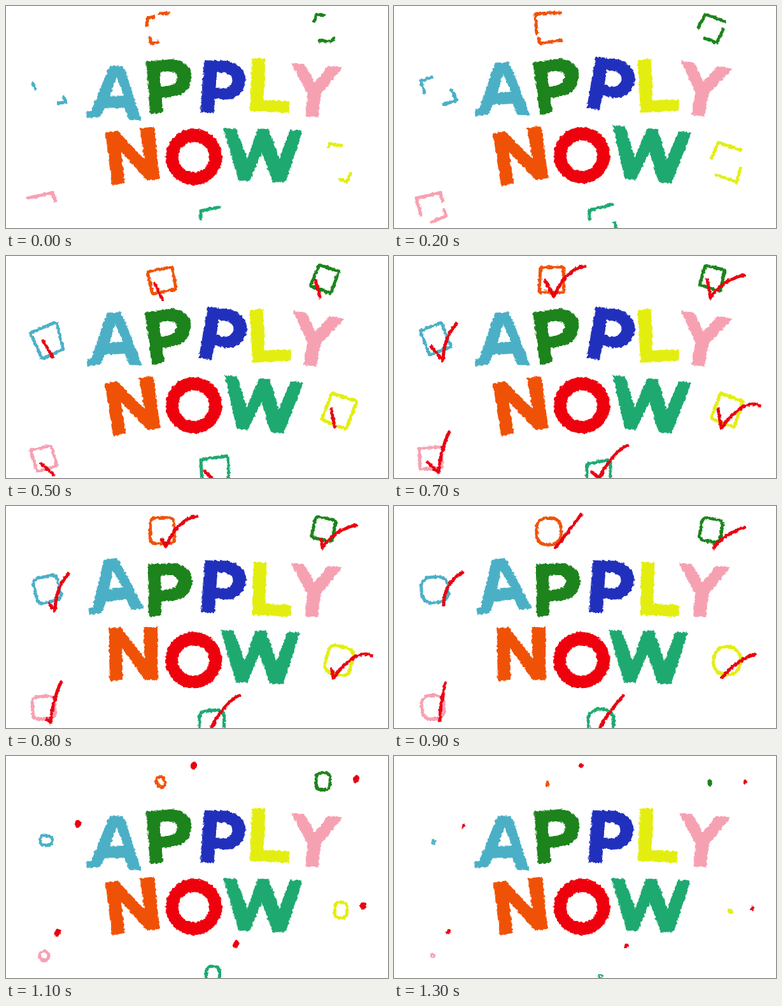
Animation of 600 by 350 pixels, one loop 1.4 s. Source, as an HTML page with a canvas:

```html
<!DOCTYPE html>
<html lang="en">
<head>
<meta charset="utf-8">
<title>Apply now</title>
<style>
  html, body { margin: 0; width: 100%; height: 100%; overflow: hidden; background: #fff; }
  canvas { display: block; filter: url(#rough); }
  svg { position: absolute; }
</style>
</head>
<body>
<canvas id="stage" width="600" height="350" role="img" aria-label="APPLY NOW"></canvas>
<svg width="0" height="0">
  <filter id="rough" x="0" y="0" width="1" height="1" color-interpolation-filters="sRGB">
    <feTurbulence type="fractalNoise" baseFrequency=".22" numOctaves="2" seed="4"/>
    <feDisplacementMap in="SourceGraphic" scale="5" xChannelSelector="R" yChannelSelector="G"/>
  </filter>
</svg>
<script>
const ctx = document.getElementById('stage').getContext('2d');
const RED = '#ea0010', STEP = 100, STEPS = 14;

// Each letter: colour, pivot, outline, then [degrees, dx, dy] for the two other poses.
const letters = [
  ['#4bb0c6', 170, 137, 'M163 95H183L187 103 212 180 193 178 187 160H155L148 173 145 175 127 176V167L134 166 160 102ZM174 111 186 142H163Z',
    [-3.3, -1.3, -5.5], [-9.5, -2.5, -11]],
  ['#1d831c', 255, 127, 'M221 88L264 84Q291 89 291 113Q288 138 264 142L244 145 246 167 227 170ZM242 104L258 102Q270 105 270 113Q268 124 256 126L243 128Z',
    [-3.5, 0, -.5], [3.5, 0, 6]],
  ['#2130bc', 341, 127, 'M312 86L348 87Q375 93 376 117Q372 146 345 147L328 145 326 168 306 167ZM331 104L344 105Q357 109 356 118Q353 131 341 131L329 129Z',
    [5.7, 1, -3], [0, 1, 0]],
  ['#e3ee10', 415, 126, 'M387 83H407L404 148 445 151 444 168 384 165Z', [-5, 0, 0], [-1, 2.5, 6]],
  ['#f6a1b2', 487, 133, 'M448 90L468 92 485 121 506 95 528 97 494 139 490 175 471 174 474 138Z', [4, 0, -1], [0, -.5, 0]],
  ['#ef5206', 199, 236, 'M157 200L175 197 218 243 211 193 232 191 241 272 222 275 180 228 186 279 167 282Z', [-2, 0, 0], [6, 1, -3]],
  ['#ef000d', 295, 238, 'M251 238a44 44 0 1 0 88 0a44 44 0 1 0-88 0ZM270 238.5a25 24.5 0 1 0 50 0a25 24.5 0 1 0-50 0Z',
    [0, 0, -2.5], [0, -.5, 5]],
  ['#1ea971', 403, 235, 'M342 193L361 194 379 242 396 194H412L429 243 446 196 465 197 439 277 419 277 402 230 383 275 366 275Z',
    [3.5, -.7, -.5], [0, -4, 3]],
];

// Shapes are four corners followed by a corner radius.
const quad = (...corners) => [...corners, 2];
function rect(cx, cy, w, h, r, degrees = 0) {
  const a = degrees * Math.PI / 180, c = Math.cos(a), s = Math.sin(a);
  const corners = [[-1, -1], [1, -1], [1, 1], [-1, 1]].flatMap(([i, j]) => {
    const x = i * w / 2, y = j * h / 2;
    return [cx + x * c - y * s, cy + x * s + y * c];
  });
  return [...corners, r];
}

// open: first pen strokes; shapes: keys two steps apart; leg, tick, tail, dots: the red mark.
const boxes = [
  { color: '#ef5206',
    open: ['M232 17L222 19 221 30M242 12L256 11M226 50L228 59 239 57', 'M261 11Q235 10 222 14L224 43M227 51L229 59 262 54'],
    shapes: [quad(222, 25, 261, 17, 267, 52, 230, 60), quad(230, 18, 266, 17, 267, 57, 228, 57),
      rect(243, 40, 38, 42, 15), rect(243, 41, 12, 16, 5, -25), rect(241, 43, 1, 5, .4)],
    leg: 'M234 44L245 67', tick: 'M237 38L251 64Q270 20 300 16', tail: 'M254 65Q275 40 294 13',
    dots: [295, 15, 294, 15] },
  { color: '#1d831c',
    open: ['M484 24L488 13 499 14M492 55L510 56 515 51', 'M478 34L489 13 519 24M488 51L507 58 517 37'],
    shapes: [quad(492, 14, 523, 24, 510, 59, 478, 47), quad(489, 15, 520, 22, 512, 56, 480, 45),
      rect(498, 38, 33, 36, 8, 10), rect(498, 40, 22, 27, 8, 4), rect(496, 42, 2, 6, .8)],
    leg: 'M486 38L493 65', tick: 'M492 37L497 66Q515 38 550 30', tail: 'M502 66Q520 43 550 34',
    dots: [550, 36, 552, 41] },
  { color: '#4bb0c6',
    open: ['M42 121L46 131M91 143L94 152 82 153', 'M60 112L42 118 48 137M91 133L98 149 78 155'],
    shapes: [quad(38, 121, 79, 104, 90, 147, 57, 162), quad(41, 118, 74, 105, 90, 143, 56, 156),
      rect(64, 132, 42, 40, 15, -5), rect(63, 133, 19, 15, 6, 8), rect(62, 136, 2, 4, .8)],
    leg: 'M58 134L73 158', tick: 'M58 142L77 165Q78 128 98 107', tail: 'M78 156Q78 122 108 104',
    dots: [113, 107, 109, 110] },
  { color: '#e3ee10',
    open: ['M507 222L508 217 526 220M524 273L535 278 541 264', 'M499 240L509 215 545 227M506 266L538 278 544 256'],
    shapes: [quad(512, 216, 551, 229, 534, 273, 496, 258), quad(513, 216, 548, 229, 534, 270, 498, 256),
      rect(523, 244, 42, 45, 20, 10), rect(526, 243, 19, 25, 7, 4), rect(528, 245, 4, 3, 1)],
    leg: 'M511 242L516 269', tick: 'M509 242L514 271Q551 223 574 236', tail: 'M515 270Q545 238 567 234',
    dots: [561, 236, 563, 240] },
  { color: '#f6a1b2',
    open: ['M34 303L73 294 77 307', 'M42 329L35 303 73 294 76 307M78 321L82 331 58 341'],
    shapes: [quad(38, 306, 71, 299, 80, 331, 49, 340), quad(39, 303, 75, 301, 75, 334, 41, 336),
      rect(61, 317, 35, 37, 13, -4), rect(60, 315, 14, 14, 6.5), rect(61, 315, 3, 2, .8)],
    leg: 'M55 327L75 345', tick: 'M53 325L70 342Q72 310 86 278', tail: 'M72 338Q73 305 81 279',
    dots: [81, 279, 85, 277] },
  { color: '#1ea971',
    open: ['M306 335V323L335 317', 'M307 336V322L343 313M347 341L350 352'],
    shapes: [quad(306, 321, 348, 315, 350, 352, 308, 360), quad(303, 328, 340, 321, 340, 362, 303, 362),
      rect(325, 341, 40, 42, 18), rect(325, 344, 21, 25, 9), rect(324, 347, 2, 2, .8)],
    leg: 'M312 339L323 350', tick: 'M311 341L322 350Q345 308 366 299', tail: 'M323 350Q335 328 360 299',
    dots: [361, 297, 365, 299] },
];

const mix = (a, b, k) => a + (b - a) * k;

function stroke(path, color, width = 5) {
  ctx.strokeStyle = color;
  ctx.lineWidth = width;
  ctx.stroke(path);
}

function roundPoly(s) {
  const p = new Path2D(), r = s[8];
  p.moveTo((s[6] + s[0]) / 2, (s[7] + s[1]) / 2);
  for (let i = 0; i < 8; i += 2) {
    const j = (i + 2) % 8;
    p.arcTo(s[i], s[i + 1], (s[i] + s[j]) / 2, (s[i + 1] + s[j + 1]) / 2, r);
  }
  p.closePath();
  return p;
}

// Strokes around two opposite corners, reaching a share k along each side.
function cornerStrokes(s, k) {
  const p = new Path2D();
  const toward = (i, j) => [mix(s[i], s[j], k), mix(s[i + 1], s[j + 1], k)];
  for (const i of [0, 4]) {
    p.moveTo(...toward(i, (i + 6) % 8));
    p.lineTo(s[i], s[i + 1]);
    p.lineTo(...toward(i, i + 2));
  }
  return p;
}

function drawBox(box, n) {
  if (n < 3) return stroke(new Path2D(box.open[n < 2 ? 0 : 1]), box.color);
  if (n === 3) return stroke(cornerStrokes(box.shapes[0], .85), box.color);
  const k = Math.max(0, (n - 5) / 2), i = Math.floor(k);
  const next = box.shapes[Math.ceil(k)];
  const shape = box.shapes[i].map((v, j) => mix(v, next[j], k - i));
  stroke(roundPoly(shape), box.color);
}

function drawMark({ leg, tick, tail, dots }, n) {
  if (n < 5) return;
  if (n > 10) {
    const k = (n - 11) / 2;
    ctx.fillStyle = RED;
    ctx.beginPath();
    ctx.ellipse(mix(dots[0], dots[2], k), mix(dots[1], dots[3], k), mix(5, 3, k), mix(6.3, 4, k), .3, 0, 7);
    return ctx.fill();
  }
  const skip = { 8: 16, 10: 32 }[n];
  if (n === 6) ctx.setLineDash([55, 999]);
  if (skip) {
    ctx.setLineDash([999, skip]);
    ctx.lineDashOffset = 999;
  }
  stroke(new Path2D(n === 5 ? leg : n < 9 ? tick : tail), RED);
  ctx.setLineDash([]);
  ctx.lineDashOffset = 0;
}

function drawLetter([color, x, y, outline, ...poses], n) {
  const pose = n >= 2 && n < 8 ? poses[0] : n >= 8 && n < 11 ? poses[1] : [0, 0, 0];
  ctx.save();
  ctx.translate(x + pose[1], y + pose[2]);
  ctx.rotate(pose[0] * Math.PI / 180);
  ctx.translate(-x, -y);
  ctx.fillStyle = color;
  const path = new Path2D(outline);
  ctx.fill(path, 'evenodd');
  stroke(path, color, 1);
  ctx.restore();
}

let shown = -1;
function frame() {
  const n = Math.floor(performance.now() / STEP) % STEPS;
  if (n !== shown) {
    shown = n;
    ctx.clearRect(0, 0, 600, 350);
    ctx.lineCap = ctx.lineJoin = 'round';
    letters.forEach(letter => drawLetter(letter, n));
    boxes.forEach(box => { drawBox(box, n); drawMark(box, n); });
  }
  requestAnimationFrame(frame);
}
frame();
</script>
</body>
</html>
```
